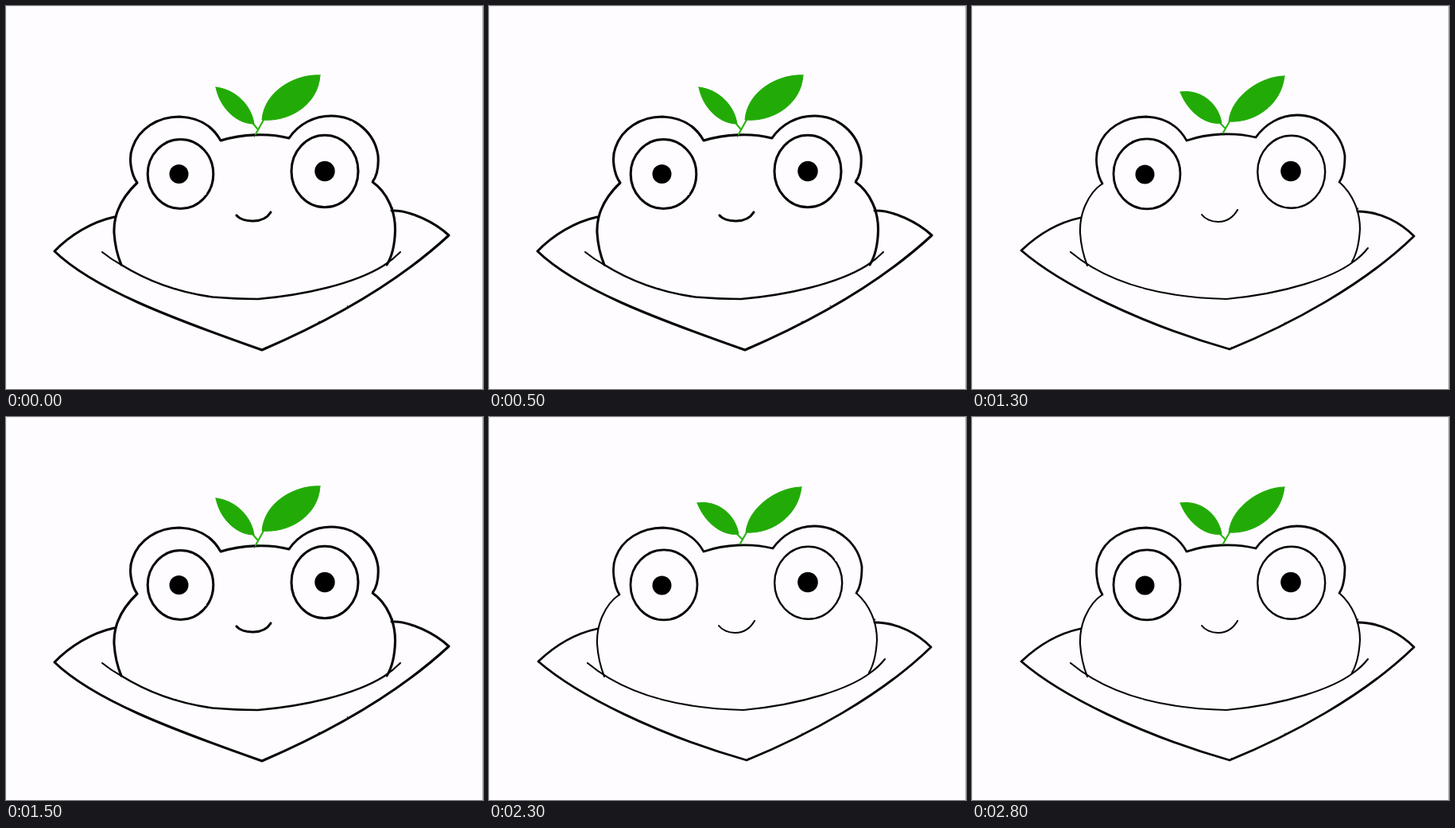
An HTML page without scripts for the animation above (3000 ms loop, 600 by 481 pixels).

```html
<!DOCTYPE html>
<html lang="en">
<head>
<meta charset="utf-8">
<title>Frog in a boat</title>
<style>
  html, body { margin: 0; width: 100%; height: 100%; overflow: hidden; background: #fefcff; }
  svg { display: block; width: 100%; height: 100%; }
  .pose { fill: none; stroke: #060606; stroke-width: 3.1; stroke-linecap: round; stroke-linejoin: round; }
  .thin { stroke-width: 2.1; }
  .pupil { fill: #000; stroke: none; }
  .leaf { fill: #22ab06; stroke: #22ab06; stroke-width: 1; }
  .stem { stroke: #2db512; stroke-width: 2.2; }

  /* Two drawings take turns: 300 ms and 200 ms */
  .pose { animation: rest .5s step-end infinite; }
  .wobble { animation-name: wobble; stroke-width: 2.8; }
  @keyframes rest { 0% { visibility: visible } 60%, 100% { visibility: hidden } }
  @keyframes wobble { 0% { visibility: hidden } 60%, 100% { visibility: visible } }
</style>
</head>
<body>
<svg viewBox="0 0 600 481" preserveAspectRatio="none">
  <defs>
    <!-- Slightly uneven ink edge -->
    <filter id="ink" filterUnits="userSpaceOnUse" x="0" y="0" width="600" height="481" color-interpolation-filters="sRGB">
      <feTurbulence type="fractalNoise" baseFrequency=".12" numOctaves="2" seed="4"/>
      <feDisplacementMap in="SourceGraphic" scale="1.5" xChannelSelector="R" yChannelSelector="G"/>
    </filter>
  </defs>

  <rect width="600" height="481" fill="#fefcff"/>
  <path d="M0 .5H600M.5 0V481" stroke="#ececee"/>
  <path d="M599.5 0V481" stroke="#b4b4b6"/>

  <g class="pose" filter="url(#ink)">
    <!-- boat -->
    <path d="M136 265C108 271 80 288 61 308C110 355 205 391 322 432C408 395 492 348 557 288C540 272 508 256 485 257"/>
    <path class="thin" d="M121 309Q132 318 145 325"/>
    <path stroke-width="2.6" d="M145 325C182 348 219 360 260 365.5Q290 368 317 368C375 363 438 349 475 326"/>
    <path class="thin" d="M475 326Q486 319 496 309"/>
    <!-- head -->
    <path d="M145 325C140 313 137 301 136 285C135 262 146 240 165 222C157 211 154 191 159 178C167 154 191 139 218 139C243 140 260 151 270 169C296 161 330 159 356 166C368 148 388 138 409 138C440 138 464 160 468 188C469 202 466 214 461 221C480 234 490 259 489.5 282C489 300 486 314 479 325"/>
    <!-- face -->
    <ellipse cx="219.5" cy="211" rx="41.3" ry="43.5"/>
    <ellipse cx="401" cy="207.5" rx="42" ry="45.3"/>
    <circle class="pupil" cx="217.5" cy="211" r="12"/>
    <circle class="pupil" cx="401" cy="207.5" r="12.7"/>
    <path d="M290 263C298 272 324 274 333 259"/>
    <!-- sprout -->
    <path class="stem" d="M314 161L324 143M311 148L316 154"/>
    <path class="leaf" d="M264 102C290 105 309 126 312 148C290 148 269 128 264 102Z"/>
    <path class="leaf" d="M395 87C367 85 325 105 322 143C356 146 393 124 395 87Z"/>
  </g>

  <g class="pose wobble" filter="url(#ink)">
    <!-- boat -->
    <path d="M136 266C108 272 82 288 62 307C112 350 212 399 324 431C400 400 492 351 556 289C540 273 515 258 485 258"/>
    <path class="thin" d="M124 309C166 344 228 366 320 368C395 361 454 341 480 321Q490 314 498 304"/>
    <!-- head -->
    <path class="thin" d="M145 326C140 313 137 301 136 285C135 262 145 236 164 223"/>
    <path d="M164 223C157 212 154 190 159 177C167 154 191 139 219 139C243 140 260 151 270 169C296 160 330 158 357 165C369 148 388 137 409 137C440 137 465 160 469 188C469 202 467 214 462 221"/>
    <path class="thin" d="M462 221C479 236 488 258 488 280C487 298 484 311 478 321"/>
    <!-- face -->
    <ellipse cx="220" cy="210.8" rx="42" ry="44"/>
    <ellipse cx="401.7" cy="208.3" rx="42.5" ry="45.5" stroke-width="2.4"/>
    <circle class="pupil" cx="217.5" cy="211.5" r="12"/>
    <circle class="pupil" cx="401" cy="207.5" r="12.8"/>
    <path class="thin" d="M289 262C297 273 322 277 334 256"/>
    <!-- sprout -->
    <path class="stem" d="M316 159L324 145M312 147L318 153"/>
    <path class="leaf" d="M262 108C287 104 310 122 314 147C293 150 271 132 262 108Z"/>
    <path class="leaf" d="M393 88C364 88 326 113 323 145C355 147 389 125 393 88Z"/>
  </g>
</svg>
</body>
</html>
```
